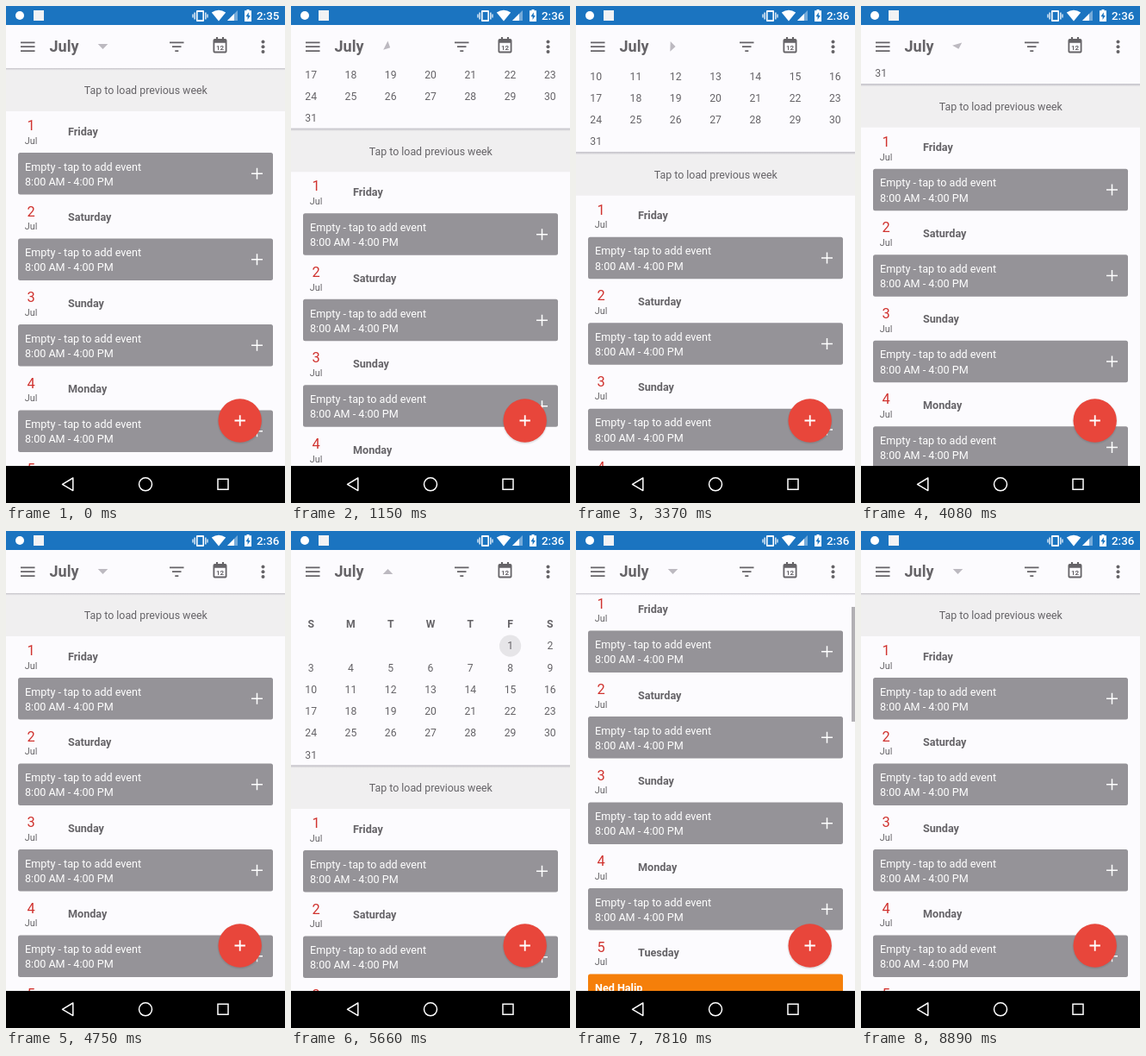
These frames come from a looping animation (324 px wide and 576 px high, 8.92 s). An HTML page:

```html
<!DOCTYPE html>
<html lang="en">
<head>
<meta charset="utf-8">
<title>Calendar agenda</title>
<style>
  html, body { margin: 0; width: 100%; height: 100%; overflow: hidden; background: #fcfbfe; }
  svg { display: block; width: 100%; height: 100%; }
  text { font-family: Roboto, "Open Sans", sans-serif; font-size: 12.6px; }
  .bold { font-weight: 700; }
  .mid { text-anchor: middle; }
  .ink { fill: #656367; }
  .icon { fill: #656367; }
  .line { fill: none; stroke: #656367; stroke-width: 1.8; }
  .nav { fill: none; stroke: #fff; stroke-width: 1.5; }
</style>
</head>
<body>
<svg viewBox="0 0 324 576" preserveAspectRatio="xMinYMin meet">
  <defs>
    <linearGradient id="shade" x1="0" y1="0" x2="0" y2="1">
      <stop offset="0" stop-color="#85828f" stop-opacity=".5"/>
      <stop offset="1" stop-color="#85828f" stop-opacity="0"/>
    </linearGradient>
    <radialGradient id="glow">
      <stop offset=".85" stop-color="#333" stop-opacity=".25"/>
      <stop offset="1" stop-color="#333" stop-opacity="0"/>
    </radialGradient>
    <clipPath id="calClip"><rect x="0" y="72" width="324" height="461"/></clipPath>
  </defs>

  <rect width="324" height="576" fill="#fcfbfe"/>
  <g id="list"></g>

  <g clip-path="url(#calClip)">
    <g id="sheet">
      <rect y="-228" width="324" height="300" fill="#fcfbfe"/>
      <g id="month"></g>
      <rect y="71.3" width="324" height="3.4" fill="url(#shade)"/>
    </g>
  </g>
  <rect id="thumb" x="320" width="4" height="133" fill="#b2b0b4"/>

  <!-- toolbar -->
  <rect y="22" width="324" height="50" fill="#fcfbfe"/>
  <path class="line" d="M17 42.3h16.5M17 47.2h16.5M17 52.1h16.5"/>
  <text class="bold ink" x="50.5" y="53.4" style="font-size:18px">July</text>
  <path id="arrow" d="M-5.8 -3h11.6L0 3z" fill="#bcb9c0"/>
  <path class="line" d="M190 42.3h16.5M193 47.2h10.5M196.3 52.1h4"/>
  <path class="icon" fill-rule="evenodd" d="M242.5 38h1.5v-2h2v2h5v-2h2v2h1.5q2 0 2 2v12.5q0 2-2 2h-12q-2 0-2-2v-12.5q0-2 2-2zM242.3 42.8v9.800h12.4v-9.800z"/>
  <text class="bold ink mid" x="248.5" y="50.7" style="font-size:8px">12</text>
  <g class="icon"><circle cx="298.5" cy="41.4" r="2"/><circle cx="298.5" cy="47.2" r="2"/><circle cx="298.5" cy="53" r="2"/></g>

  <!-- status bar -->
  <rect width="324" height="22" fill="#1b74c0"/>
  <circle cx="16" cy="11" r="5" fill="#fff"/>
  <rect x="32" y="5" width="12" height="12" fill="#f2f2f4"/>
  <g fill="#fff">
    <path fill-rule="evenodd" d="M222 5h7q1 0 1 1v11q0 1-1 1h-7q-1 0-1-1V6q0-1 1-1zM222.6 7v9h5.8V7zM218.5 7.5h1.3v8h-1.3zM231.2 7.5h1.3v8h-1.3zM216.4 9.5h1.2v4h-1.2zM233.4 9.5h1.2v4h-1.2z"/>
    <path d="M247 17.5L238.8 7.6Q247 1.8 255.2 7.6z"/>
    <path d="M257 17L269 5v12z" opacity=".4"/>
    <path d="M257 17l8-8v8z"/>
    <path fill-rule="evenodd" d="M279.5 4h3v1.3h2.5V18h-8V5.3h2.5zM281.8 7.3l-3.3 5h2.1v3.6l3.2-5h-2z"/>
  </g>
  <text id="clock" x="291" y="15.7" fill="#fff" style="font-size:13.4px;font-weight:500"></text>

  <!-- floating button -->
  <circle cx="271.7" cy="481.5" r="27" fill="url(#glow)"/>
  <circle cx="271.7" cy="480.5" r="25.2" fill="#e8463b"/>
  <path d="M265.5 480.5h12.4M271.7 474.3v12.4" stroke="#fff" stroke-width="1.8"/>

  <!-- navigation bar -->
  <rect y="533" width="324" height="43"/>
  <path class="nav" d="M65.5 554.3L77.8 547v14.6z" stroke-linejoin="round"/>
  <circle class="nav" cx="162" cy="554.3" r="7.5"/>
  <rect class="nav" x="246" y="548.3" width="12" height="12"/>
</svg>
<script>
const LOOP = 8920, RANGE = 200, ROW = 25.25, DAY_STEP = 99.5;
const $ = id => document.getElementById(id);

function add(parent, tag, attrs, content) {
  const el = document.createElementNS("http://www.w3.org/2000/svg", tag);
  for (const key in attrs) el.setAttribute(key, attrs[key]);
  if (content !== undefined) el.textContent = content;
  parent.appendChild(el);
  return el;
}

function buildList() {
  const list = $("list");
  add(list, "rect", { y: 72, width: 324, height: 50, fill: "#f0eff0" });
  add(list, "text", { class: "mid ink", x: 162.3, y: 102.3, style: "font-size:12.4px" }, "Tap to load previous week");
  ["Friday", "Saturday", "Sunday", "Monday", "Tuesday"].forEach((name, i) => {
    const day = add(list, "g", { transform: `translate(0 ${i * DAY_STEP})` });
    const busy = i === 4;
    add(day, "text", { class: "mid", x: 29, y: 144, fill: "#d0322e", style: "font-size:16.4px" }, i + 1);
    add(day, "text", { class: "mid ink", x: 29, y: 159.8, style: "font-size:10.8px" }, "Jul");
    add(day, "text", { class: "bold ink", x: 72, y: 149.7 }, name);
    add(day, "rect", { x: 14, y: 170, width: 296, height: 48.5, rx: 2.5, fill: busy ? "#f57f0a" : "#959398" });
    add(day, "text", { class: busy ? "bold" : "", x: 22, y: 190.7, fill: "#fff" },
      busy ? "Ned Halip" : "Empty - tap to add event");
    add(day, "text", { x: 22, y: 207.9, fill: "#fff" }, "8:00 AM - 4:00 PM");
    if (!busy) add(day, "path", { d: "M285 194.3h13M291.5 187.8v13", stroke: "#fff", "stroke-width": 1.5 });
  });
}

function buildMonth() {
  const month = $("month");
  const colX = c => (c + 0.5) * 324 / 7;
  const rowY = r => 72 - ROW * (6.5 - r);
  const label = (text, col, row, cls = "") =>
    add(month, "text", { class: `mid ink ${cls}`, x: colX(col), y: rowY(row) + 4.3, style: "font-size:12.2px" }, text);
  [..."SMTWTFS"].forEach((d, c) => label(d, c, 0, "bold"));
  add(month, "circle", { cx: colX(5), cy: rowY(1), r: 12.6, fill: "#e6e5e8" });
  for (let d = 1; d <= 31; d++) label(d, (d + 4) % 7, 1 + Math.floor((d + 4) / 7));
}

// Opening and closing of the month sheet: start, end, from, to, deceleration power
const moves = [
  [640, 2290, 0, RANGE, 1.17],
  [2860, 4740, RANGE, 0, 2.26],
  [5400, 5660, 0, RANGE, 2],
  [6240, 6500, RANGE, 0, 2]
];
const part = (t, a, b) => Math.min(1, Math.max(0, (t - a) / (b - a)));

function sheetOffset(t) {
  let y = 0;
  for (const [a, b, from, to, power] of moves)
    if (t >= a) y = from + (to - from) * (1 - (1 - part(t, a, b)) ** power);
  return y;
}

function draw(t) {
  const open = sheetOffset(t);
  const scroll = 54.5 * Math.sin(Math.PI * part(t, 7370, 8250)) ** 1.5;
  $("list").setAttribute("transform", `translate(0 ${open - scroll})`);
  $("sheet").setAttribute("transform", `translate(0 ${open})`);
  $("arrow").setAttribute("transform", `translate(112.5 47) rotate(${-180 * open / RANGE})`);
  $("thumb").setAttribute("y", 72 + scroll * 0.293);
  $("thumb").setAttribute("opacity", t < 7380 ? 0 : 1 - part(t, 8600, 8860));
  $("clock").textContent = t < 640 ? "2:35" : "2:36";
}

buildList();
buildMonth();
const start = performance.now();
function tick() {
  draw((performance.now() - start) % LOOP);
  requestAnimationFrame(tick);
}
tick();
</script>
</body>
</html>
```
